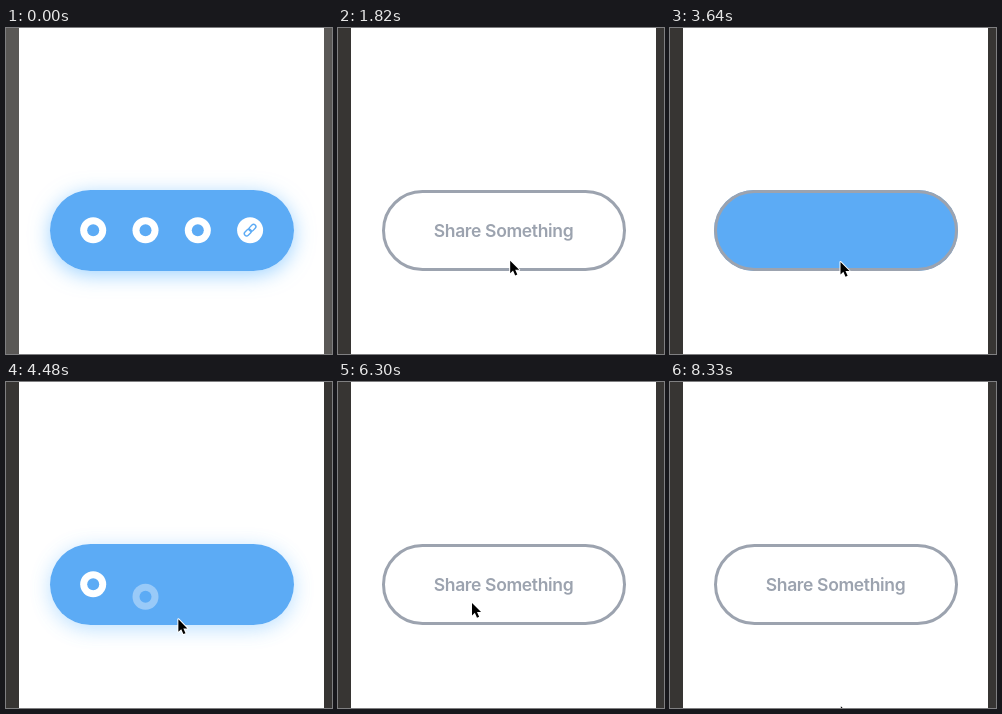
Recreate the animation shown at these times as an HTML page. Size 326 px wide and 326 px high, loop 8400 ms.

```html
<!DOCTYPE html>
<html lang="en">
<head>
<meta charset="utf-8">
<title>Share button</title>
<style>
  html, body { margin: 0; width: 100%; height: 100%; overflow: hidden; }
  body { position: relative; background: #373533; }
  #panel { position: absolute; left: 13px; top: 0; width: 305px; height: 326px; background: #fff; }
  .pill { position: absolute; left: 44px; top: 161.5px; width: 243.5px; height: 81px;
          box-sizing: border-box; border-radius: 41px; }
  #glow { box-shadow: 0 4px 20px rgba(80, 175, 255, .55); }
  #fill { background: #5cabf5; }
  #border { border: 3px solid #9ca3af; }
  svg { position: absolute; left: 0; top: 0; }
  text { font: 600 17.5px Inter, "Open Sans", sans-serif; letter-spacing: -.02em; fill: #9ca3af; }
</style>
</head>
<body>
<div id="panel"></div>
<div id="glow" class="pill"></div>
<div id="fill" class="pill"></div>
<div id="border" class="pill"></div>
<svg width="326" height="326" viewBox="0 0 326 326">
  <defs>
    <g id="dot"><circle r="13" fill="#fff"/><circle r="6" fill="#5cabf5"/></g>
    <rect id="ring" x="-7.2" y="-2.3" width="7.8" height="4.6" rx="2.3"/>
  </defs>
  <text id="label" x="165.5" y="208.5" text-anchor="middle">Share Something</text>
  <g id="icons">
    <use href="#dot"/>
    <use href="#dot"/>
    <use href="#dot"/>
    <g>
      <circle r="13" fill="#fff"/>
      <g transform="rotate(-45)" fill="none" stroke="#5cabf5" stroke-width="1.4">
        <use href="#ring"/><use href="#ring" transform="scale(-1)"/>
      </g>
    </g>
  </g>
  <g id="cursor">
    <circle id="press" r="21.5" fill="#777" fill-opacity=".25"/>
    <path d="M0 0V15.2L3.5 12L6.1 18L8.7 16.9L6.1 11.1H11Z" transform="scale(.82)"
          stroke="#fff" stroke-width="2.4" stroke-linejoin="round" paint-order="stroke"/>
  </g>
</svg>
<script>
const LOOP = 8400, STEP = 70, HOLD = 210;

// each release of the pointer toggles the button
const releases = [560, 2170, 3430, 4340, 5670, 6650, 7770];

// where the pointer turns or rests: time, x, y
const stops = [
  [0, 190, 330], [490, 158, 222], [1330, 165, 271], [1890, 172.5, 231], [3640, 170.5, 234],
  [4340, 171, 234], [5250, 192.5, 286], [5600, 150, 224], [6300, 134, 221],
  [6580, 137, 222], [7200, 165, 270], [7700, 166, 226], [LOOP, 171, 327]
];

const $ = id => document.getElementById(id);
const icons = [...$("icons").children];
const ramp = (t, from, to) => Math.min(1, Math.max(0, (t - from) / (to - from)));
const easeOut = p => 1 - (1 - p) ** 2;
const easeInOut = p => p * p * (3 - 2 * p);
const mix = (a, b, k) => a + (b - a) * k;
const fade = (id, value) => { $(id).style.opacity = value; };

function pointerAt(t) {
  const i = stops.findIndex(stop => stop[0] > t);
  const [t0, x0, y0] = stops[i - 1], [t1, x1, y1] = stops[i];
  const k = easeInOut(ramp(t, t0, t1));
  return [mix(x0, x1, k), mix(y0, y1, k)];
}

function drawButton(open, u) {
  fade("fill", open ? ramp(u, -30, 110) : 1 - ramp(u, 215, 305));
  fade("border", open ? 1 - ramp(u, -30, 110) : ramp(u, 0, 140));
  fade("glow", open ? ramp(u, 0, 200) : 1 - ramp(u, 0, 200));
  fade("label", open ? 1 - ramp(u, -30, 80) : ramp(u, 215, 325));
  icons.forEach((icon, i) => {
    const start = 20 + 95 * i;
    const shown = open ? easeOut(ramp(u, start, start + 120)) : 1;
    icon.style.opacity = open ? shown : 1 - ramp(u, 0, 180);
    icon.setAttribute("transform", `translate(${87.2 + 52.3 * i} ${202.2 + 20 * (1 - shown)})`);
  });
}

function draw(t) {
  const done = releases.filter(time => time <= t);
  const since = done.length ? done[done.length - 1] : -LOOP;
  drawButton(done.length % 2 === 0, t - since);

  document.body.style.background = t < STEP ? "#5a5856" : "#373533";
  fade("cursor", t < STEP ? 0 : 1);
  fade("press", releases.some(time => t >= time - HOLD && t < time) ? 1 : 0);
  $("cursor").setAttribute("transform", `translate(${pointerAt(t)})`);
}

const begin = performance.now();
function tick() {
  const t = (performance.now() - begin) % LOOP;
  draw(Math.floor(t / STEP) * STEP);
  requestAnimationFrame(tick);
}
tick();
</script>
</body>
</html>
```
